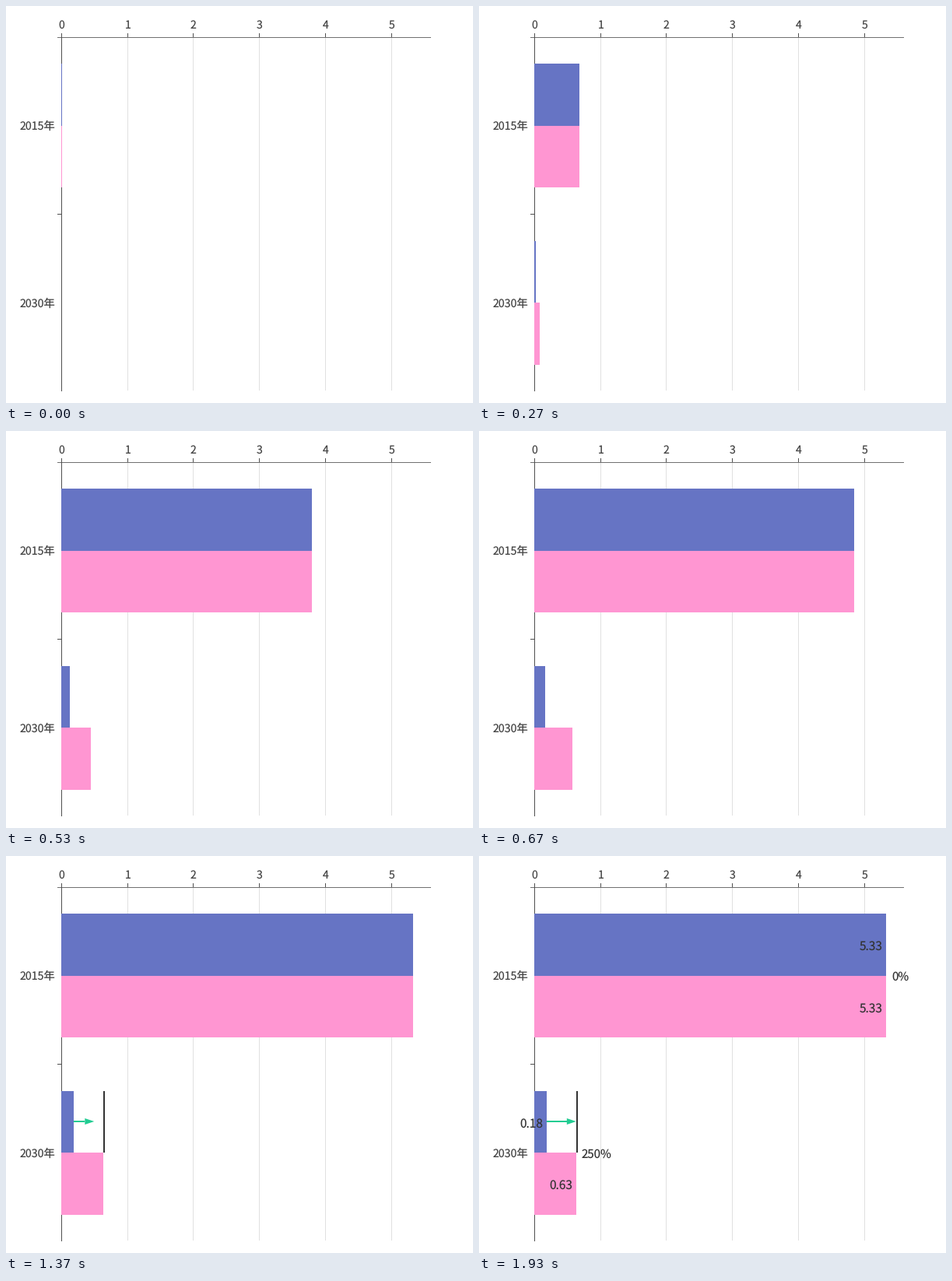
A matplotlib script that plays this animation: 600x510 px, repeating every 3.01 s.

```python
import matplotlib.pyplot as plt
from matplotlib.animation import FuncAnimation
from matplotlib.patches import Polygon, Rectangle

W, H, DPI = 600, 510, 60
PX = 72 / DPI                      # points per pixel
LOOP, TICK, STEP = 3010, 10, 100 / 3
LAST_STEP = 58

X0, UNIT = 71.4, 84.78             # value axis origin and pixels per unit
TOP, BAND, BAR = 40, 227.5, 79.6
BLUE, PINK, GREEN = "#6674c4", "#ff96d2", "#22cc92"
AXIS, GRID, INK, TICK_INK = "#505050", "#e0e0e0", "#333333", "#464646"
DATA = [("2015年", 5.33, 5.33, "0%"), ("2030年", 0.18, 0.63, "250%")]
HEAD, HALF = 12, 4                 # arrow head length and half height
ARROW_Y = 341

plt.rcParams["font.family"] = ["Noto Sans CJK JP"]
plt.rcParams["text.hinting"] = "none"

fig = plt.figure(figsize=(W / DPI, H / DPI), dpi=DPI, facecolor="white")
ax = fig.add_axes([0, 0, 1, 1])
ax.set_xlim(0, W)
ax.set_ylim(H, 0)
ax.axis("off")


def box(x, y, w, h, color, z):
    return ax.add_patch(Rectangle((x, y), w, h, fc=color, lw=0, zorder=z))


def label(x, y, s, size, color, ha):
    return ax.text(x, y, s, fontsize=size * PX, color=color, ha=ha,
                   va="baseline", zorder=6)


def ease(t):
    t = min(max(t, 0), 1)
    return 4 * t ** 3 if t < 0.5 else 1 - 4 * (1 - t) ** 3


def to_x(value):
    return X0 + UNIT * value


# Axes, grid and tick labels
for n in range(6):
    x = int(to_x(n) - 0.1)
    if n:
        box(x, 41, 1, 453, GRID, 1)
    box(x, 35, 1, 5, AXIS, 2)
    label(x + 0.5, 29.1, str(n), 14, TICK_INK, "center")
box(66, 40, 480, 1, "#707070", 2)
box(66, 267, 5, 1, AXIS, 2)
box(71, 40, 1, 455, AXIS, 2)

bars, notes = [], []
for i, (name, before, after, change) in enumerate(DATA):
    top = TOP + BAND * i + (BAND - 2 * BAR) / 2
    label(63, 159 + 228 * i, name, 14.2, TICK_INK, "right")
    for j, (value, color) in enumerate(((before, BLUE), (after, PINK))):
        y = top + BAR * j
        bars.append((box(X0, y, 0, BAR, color, 3), value))
        notes.append(label(to_x(value) - 4.8, y + 46.9, f"{value:.2f}",
                           15.4, INK, "right"))
    notes.append(label(to_x(after) + 6.9, top + BAR + 6.4, change,
                       15, INK, "left"))

# Arrow from the lower value to the limit line
start, end = to_x(DATA[1][1]), to_x(DATA[1][2])
limit = box(125, 301.6, 2, 79.4, INK, 4)
shaft = box(start, ARROW_Y - 1, 0, 2, GREEN, 5)
head = ax.add_patch(Polygon([(0, 0)] * 3, fc=GREEN, lw=0, zorder=5))


def draw(frame):
    step = min(int((frame * TICK + 5) / STEP), LAST_STEP)
    t = 50 + step * STEP

    grow = ease(t / 1000)
    for bar, value in bars:
        bar.set_width(UNIT * value * grow)

    for part in (limit, shaft, head):
        part.set_visible(t >= 1000)
    base = start + (end - HEAD - start) * ease((t - 1000) / 800)
    shaft.set_width(base - start)
    head.set_xy([(base, ARROW_Y - HALF), (base + HEAD, ARROW_Y),
                 (base, ARROW_Y + HALF)])

    fade = ease((t - 1800) / 200)
    for note in notes:
        note.set_alpha(fade)
        note.set_visible(fade > 0)
    return []


anim = FuncAnimation(fig, draw, frames=LOOP // TICK, interval=TICK,
                     repeat=True, repeat_delay=0, blit=False)
plt.show()
```
